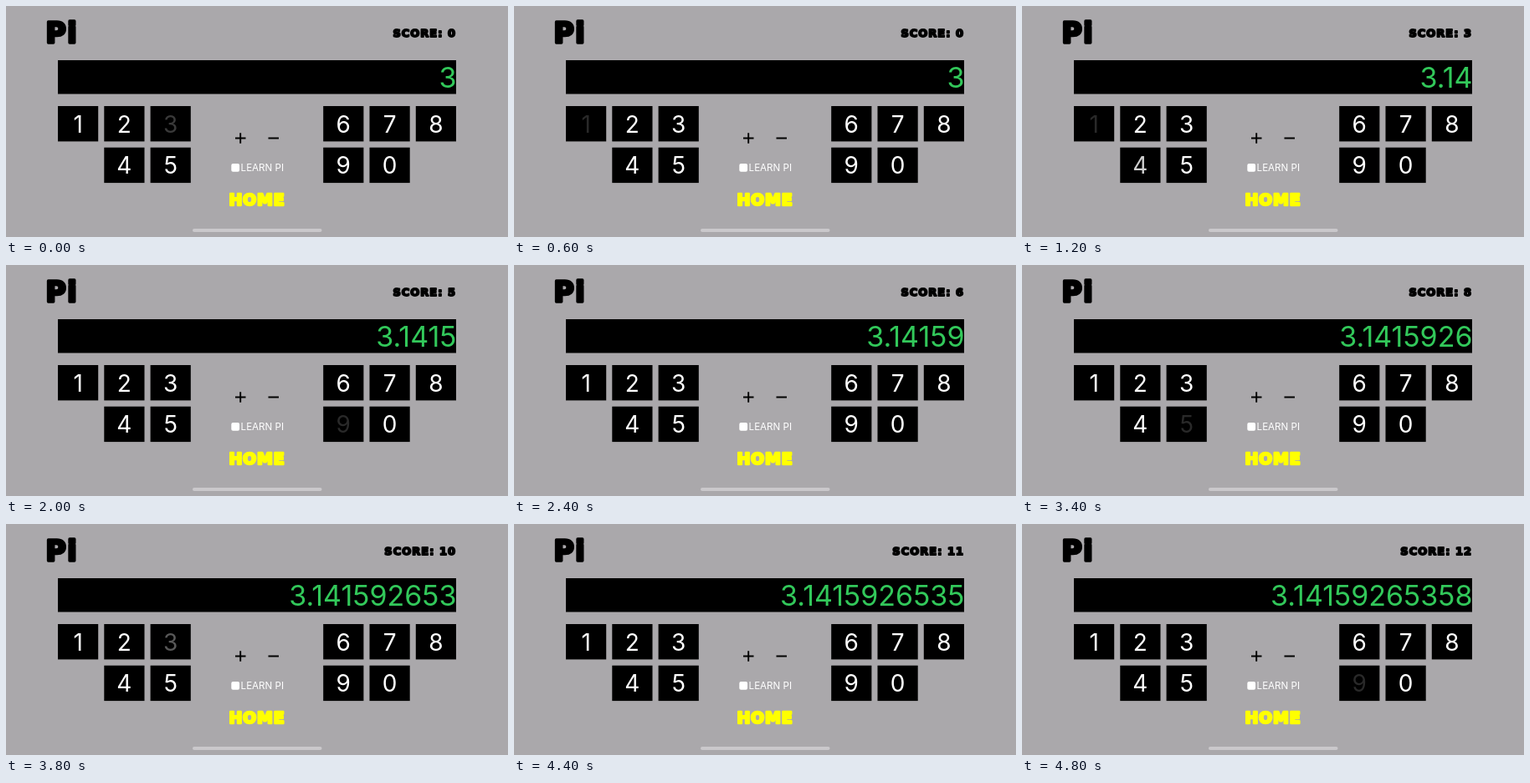
Recreate the animation shown at these times as an HTML page. Size 600 by 277 pixels, loop 5 s.

```html
<!DOCTYPE html>
<html lang="en">
<head>
<meta charset="utf-8">
<title>Pi trainer</title>
<style>
  html, body { margin: 0; width: 100%; height: 100%; overflow: hidden; background: #aaa8ab; }
  svg { display: block; width: 100vw; height: 100vh; font-family: Inter, "Open Sans", sans-serif; }
  .bold { font-family: "DejaVu Sans", sans-serif; font-weight: 700; stroke-linejoin: round; }
  .end { text-anchor: end; }
  .mid { text-anchor: middle; }
  .key { font-size: 28px; fill: #fff; }
</style>
</head>
<body>
<svg viewBox="0 0 600 277">
  <text class="bold" x="47.5" y="43.6" font-size="33" letter-spacing="1.5" stroke="#000" stroke-width="3.4">Pi</text>
  <text class="bold end" id="score" x="538" y="36.6" font-size="13" letter-spacing="1" stroke="#000" stroke-width="1.8"></text>
  <rect x="62" y="65" width="476" height="40.5"/>
  <text class="end" id="number" x="538.5" y="98" font-size="34" fill="#32c85a"></text>
  <g id="keys"></g>
  <path d="M274 158.5h12.5M280.2 152.2v12.6M313.5 158.5h12.5" stroke="#000" stroke-width="1.9"/>
  <rect x="269.3" y="189" width="9.8" height="9.8" rx="2" fill="#fff"/>
  <text x="280.6" y="198.2" font-size="11.6" fill="#fff">LEARN PI</text>
  <text class="bold mid" x="300" y="238.6" font-size="19" letter-spacing=".8" fill="#ff0" stroke="#ff0" stroke-width="2.6">HOME</text>
  <rect x="223" y="267" width="154.5" height="4" rx="2" fill="#cac8cb"/>
</svg>
<script>
const STEP = 200, LOOP = 5000, DELAY = 80, FADE = 320;
const DIGITS = "3141592653589";
// When each digit is tapped, in ms
const taps = [-60, 580, 980, 1180, 1580, 1980, 2500, 2980, 3380, 3700, 3900, 4500, 4780];
const $ = id => document.getElementById(id);

// Two rows of keys, with a gap between the left and right halves
$("keys").innerHTML = ["123678", " 4590"].map((row, r) => [...row].map((n, c) => {
  if (n === " ") return "";
  const x = 62 + c * 55.3 + (c > 2 ? 151.3 : 0), y = 120 + r * 49.7;
  return `<rect x="${x}" y="${y}" width="48.2" height="42.4"/>
    <text class="key mid" id="key${n}" x="${x + 24.1}" y="${y + 31.6}">${n}</text>`;
}).join("")).join("");

// A tapped key goes dark at once and eases back to white
function keyOpacity(age) {
  if (age < 0 || age > FADE) return 1;
  const p = age / FADE;
  return .15 + .85 * p * p * (3 - 2 * p);
}

function draw(time) {
  const count = taps.filter(tap => time >= tap + DELAY).length;
  $("score").textContent = "SCORE: " + (count > 1 ? count : 0);
  $("number").textContent = count > 1 ? "3." + DIGITS.slice(1, count) : "3";
  for (const n of "0123456789") {
    const shades = taps.map((tap, i) => DIGITS[i] === n ? keyOpacity(time - tap) : 1);
    $("key" + n).style.opacity = Math.min(...shades);
  }
}

// The picture moves on in steps of 200 ms
function tick() {
  draw(Math.floor(performance.now() % LOOP / STEP) * STEP);
  requestAnimationFrame(tick);
}
tick();
</script>
</body>
</html>
```
